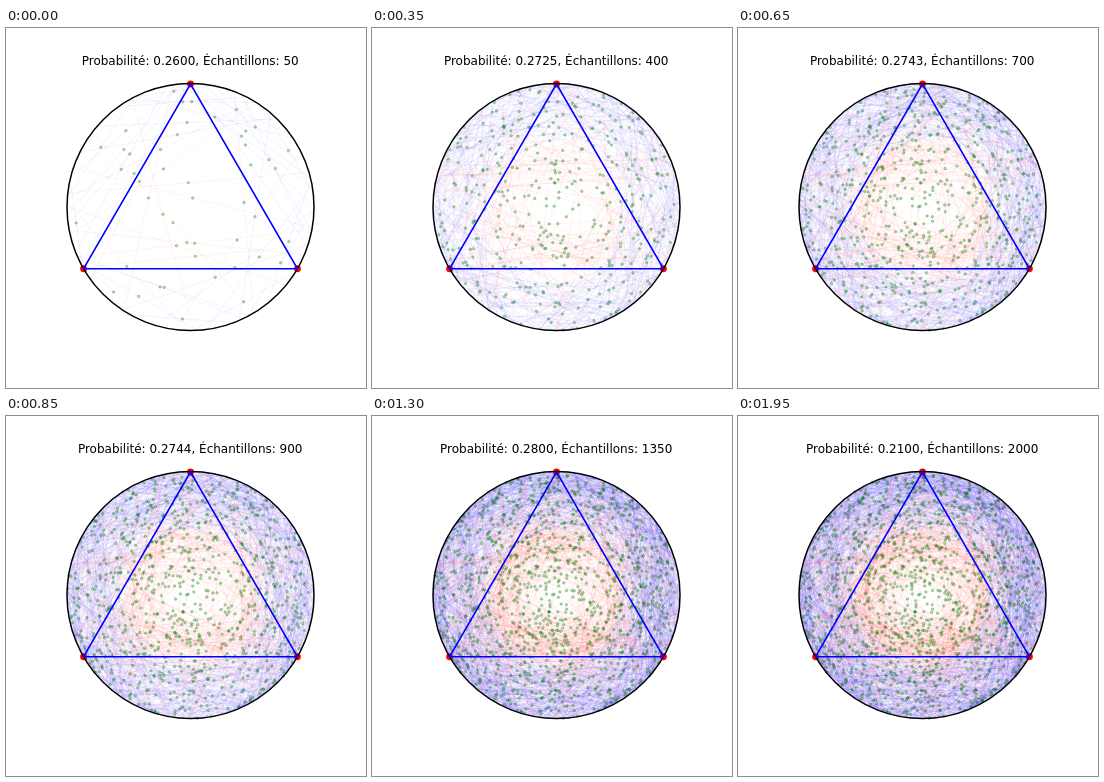
These frames come from a looping animation (360 by 360 pixels, 2 s). An HTML page with a canvas:

```html
<!DOCTYPE html>
<html lang="fr">
<head>
<meta charset="utf-8">
<style>
  html, body { margin: 0; width: 100%; height: 100%; overflow: hidden; background: #fff; }
  canvas { display: block; }
</style>
</head>
<body>
<canvas id="stage" width="360" height="360"></canvas>
<script>
const ctx = document.getElementById('stage').getContext('2d');
const CX = 184.5, CY = 179, R = 123.5;
const LOOP = 2000, STEP = 50, BATCH = 50, TOTAL = 1500;

// Key points: samples taken, long chords among them
const hits = [[0, 0], [50, 13], [400, 109], [700, 192], [900, 247], [1150, 322], [TOTAL, 420]];

function hitCount(n) {
  if (n >= TOTAL) return hits[hits.length - 1][1];
  const i = hits.findIndex(h => h[0] > n);
  const [n0, h0] = hits[i - 1], [n1, h1] = hits[i];
  return Math.round(h0 + (h1 - h0) * (n - n0) / (n1 - n0));
}

let seed = 20731;
function random() {
  seed = (seed + 0x6D2B79F5) | 0;
  let t = Math.imul(seed ^ (seed >>> 15), 1 | seed);
  t = (t + Math.imul(t ^ (t >>> 7), 61 | t)) ^ t;
  return ((t ^ (t >>> 14)) >>> 0) / 4294967296;
}

// A chord given by its midpoint, uniform over the disc; long ones lie in the inner half
function makeSample(_, i) {
  const long = hitCount(i + 1) > hitCount(i);
  const u = random(), a = random() * 2 * Math.PI;
  const d = Math.sqrt(long ? u / 4 : 0.25 + 0.75 * u);
  const half = R * Math.sqrt(1 - d * d);
  return {
    long,
    x: CX + R * d * Math.cos(a),
    y: CY + R * d * Math.sin(a),
    dx: -half * Math.sin(a),
    dy: half * Math.cos(a)
  };
}

const samples = Array.from({ length: TOTAL }, makeSample);

const w = R * Math.sqrt(3) / 2;
const corners = [[CX, CY - R + 0.5], [CX - w, CY + R / 2], [CX + w, CY + R / 2]];

function disc(x, y, r) {
  ctx.beginPath();
  ctx.arc(x, y, r, 0, 2 * Math.PI);
}

function drawSample(s) {
  ctx.globalAlpha = 0.1;
  ctx.lineWidth = 0.5;
  ctx.strokeStyle = s.long ? '#f00' : '#00f';
  ctx.beginPath();
  ctx.moveTo(s.x - s.dx, s.y - s.dy);
  ctx.lineTo(s.x + s.dx, s.y + s.dy);
  ctx.stroke();

  ctx.globalAlpha = 0.27;
  ctx.lineWidth = 1;
  ctx.fillStyle = ctx.strokeStyle = '#008000';
  disc(s.x, s.y, 1.25);
  ctx.fill();
  ctx.stroke();
}

function drawCorners() {
  ctx.fillStyle = '#f00';
  for (const [x, y] of corners) {
    disc(x, y, 3.4);
    ctx.fill();
  }
}

function drawOutlines() {
  ctx.lineWidth = 1.5;
  ctx.lineJoin = 'round';
  ctx.strokeStyle = '#000';
  disc(CX, CY, R);
  ctx.stroke();

  ctx.strokeStyle = '#00f';
  ctx.beginPath();
  for (const [x, y] of corners) ctx.lineTo(x, y);
  ctx.closePath();
  ctx.stroke();
}

function drawTitle(n) {
  ctx.fillStyle = '#000';
  ctx.font = '12px "DejaVu Sans", sans-serif';
  ctx.textAlign = 'center';
  ctx.fillText(`Probabilité: ${(hitCount(n) / n).toFixed(4)}, Échantillons: ${n}`, CX - 0.3, 37);
}

function draw(n) {
  ctx.globalAlpha = 1;
  ctx.fillStyle = '#fff';
  ctx.fillRect(0, 0, 360, 360);
  drawCorners();
  samples.slice(0, n).forEach(drawSample);
  ctx.globalAlpha = 1;
  drawOutlines();
  drawTitle(n);
}

const start = performance.now();
let shown = -1;

function tick() {
  const t = Math.max(0, performance.now() - start) % LOOP;
  const step = Math.floor(t / STEP);
  if (step !== shown) {
    shown = step;
    draw((step + 1) * BATCH);
  }
  requestAnimationFrame(tick);
}
tick();
</script>
</body>
</html>
```
